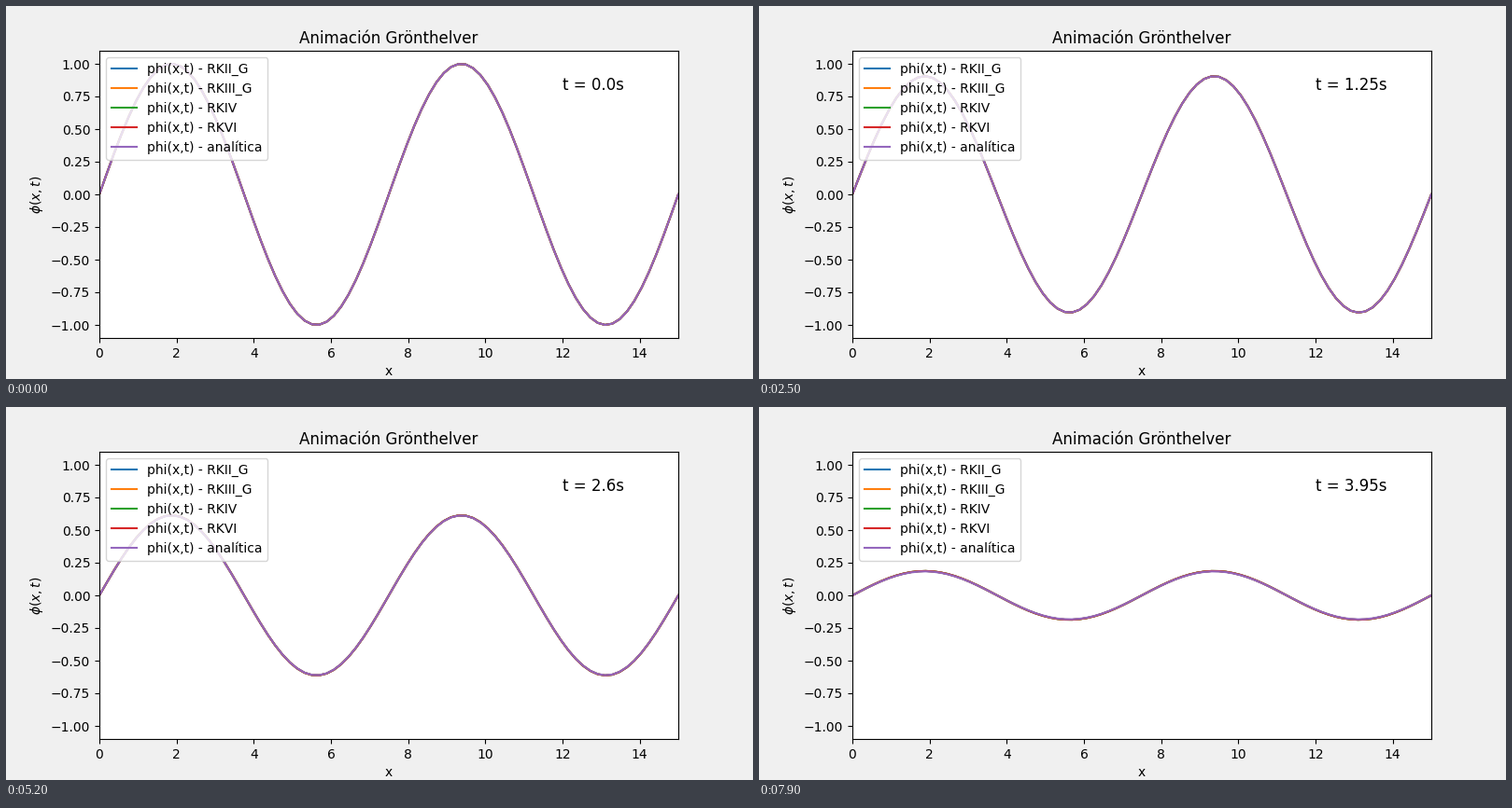
Write a matplotlib script that moves like this. It is 800 px wide and 400 px high and loops after 8 s.

```python
import numpy as np
import matplotlib.pyplot as plt
from matplotlib.animation import FuncAnimation

LENGTH, POINTS = 15, 80
FRAMES, INTERVAL, DT = 80, 100, 0.05
METHODS = ["RKII_G", "RKIII_G", "RKIV", "RKVI", "analítica"]

x, dx = np.linspace(0, LENGTH, POINTS, retstep=True)
k = 4 * np.pi / LENGTH
wave = np.sin(k * x)

# The grid Laplacian makes the numerical modes turn slightly slower.
w_exact = k**2 / 2
w_grid = (1 - np.cos(k * dx)) / dx**2
freqs = [w_grid] * 4 + [w_exact]

fig, ax = plt.subplots(figsize=(8, 4), dpi=100, facecolor="#f0f0f0")
fig.subplots_adjust(left=0.125, right=0.9, bottom=0.11, top=0.88)
ax.set(xlim=(0, LENGTH), ylim=(-1.1, 1.1), xlabel="x",
       ylabel=r"$\phi(x,t)$", title="Animación Grönthelver")
lines = [ax.plot(x, wave, label=f"phi(x,t) - {name}")[0] for name in METHODS]
clock = ax.text(12, 0.8, "", fontsize=12)
ax.legend(loc="upper left")


def update(i):
    t = round(i * DT, 2)
    for line, w in zip(lines, freqs):
        line.set_ydata(wave * np.cos(w * t))
    clock.set_text(f"t = {t}s")
    return [*lines, clock]


anim = FuncAnimation(fig, update, frames=FRAMES, interval=INTERVAL,
                     repeat=True, repeat_delay=0)
plt.show()
```
